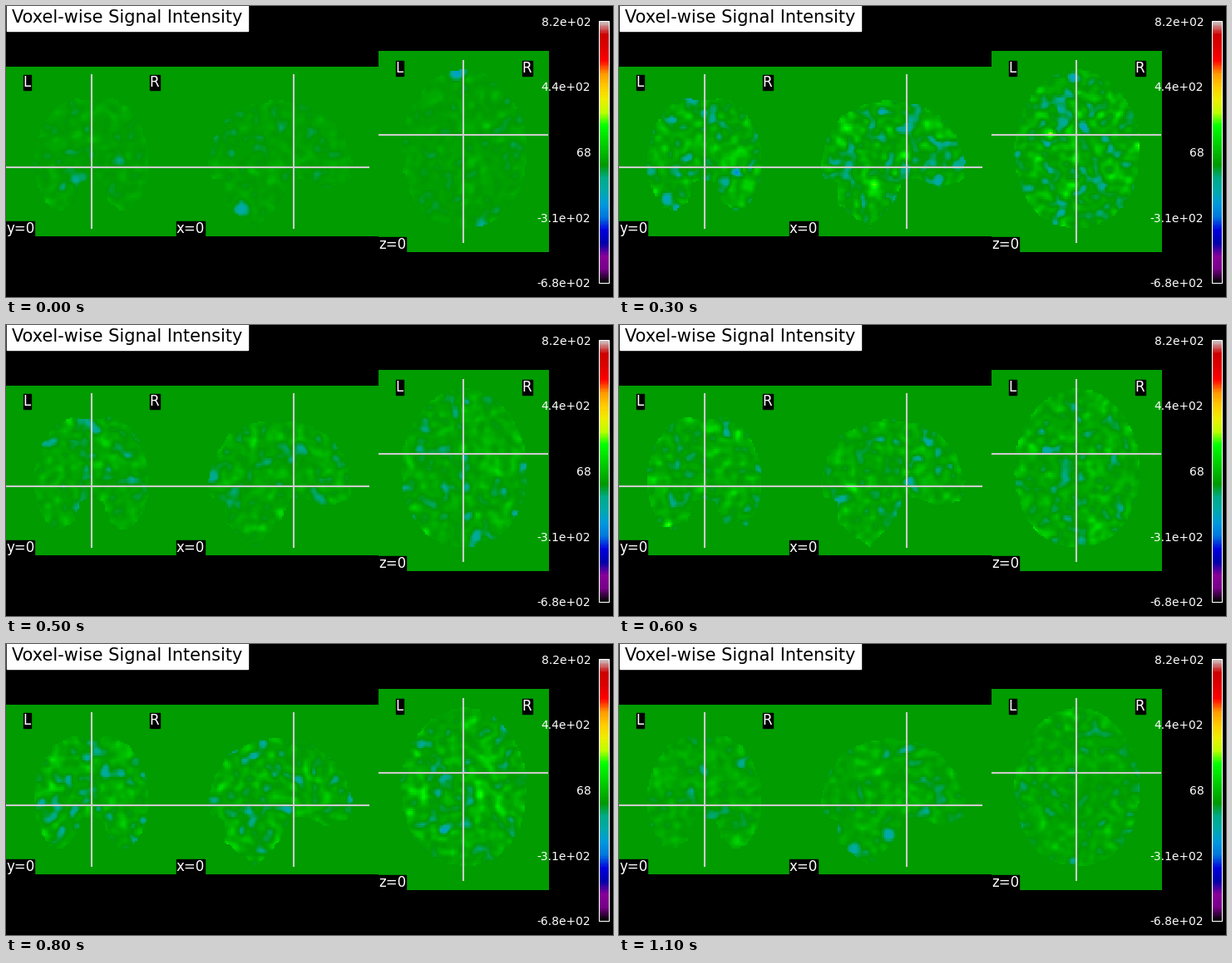
Recreate the animation shown at these times as a matplotlib script. Size 730 by 350 pixels, loop 1.2 s.

```python
import numpy as np
import matplotlib.pyplot as plt
from matplotlib.animation import FuncAnimation
from matplotlib.cm import ScalarMappable
from matplotlib.colors import Normalize
from matplotlib.path import Path

np.random.seed(7)

W, H, DPI = 730, 350, 100
FRAMES, STEP = 12, 100
NORM = Normalize(-680, 816)
CMAP = "nipy_spectral"

plt.rcParams["font.family"] = "DejaVu Sans"

# left, right, top, bottom in pixels; columns, rows in voxels
PANELS = {
    "y": (0, 205, 73, 277, 91, 91),
    "x": (205, 448, 73, 277, 109, 91),
    "z": (448, 653, 54, 296, 91, 109),
}

# mean and spread of the signal in each volume
LEVELS = [(7, 15), (14, 35), (26, 46), (12, 46), (12, 36), (15, 29),
          (15, 34), (14, 40), (14, 36), (18, 37), (18, 32), (14, 25)]

# strong spots per volume: x, y, amplitude
SPOTS = {
    0: [(283, 244, -170), (541, 81, -190), (84, 209, -110),
        (572, 263, -110), (137, 186, -90)],
    2: [(543, 82, 330), (381, 153, -120), (330, 193, -110),
        (608, 185, -100), (292, 168, 100)],
    3: [(307, 215, 240), (60, 236, -100), (125, 212, -100),
        (395, 180, -100), (530, 140, -90)],
    5: [(250, 182, -120), (360, 150, -100), (382, 210, -100),
        (566, 256, -120), (503, 126, -100)],
    7: [(380, 208, -130), (310, 250, -120), (575, 248, -110),
        (545, 84, 130), (600, 157, -100)],
    9: [(325, 212, -100), (140, 236, -110), (575, 86, 130),
        (380, 203, -100), (612, 152, -110)],
    11: [(324, 230, -190), (283, 246, -170), (110, 207, -100),
         (370, 200, -100), (140, 237, 90)],
}


def grid(name):
    x0, x1, y0, y1, nx, ny = PANELS[name]
    x = x0 + (np.arange(nx) + 0.5) * (x1 - x0) / nx
    y = y0 + (np.arange(ny) + 0.5) * (y1 - y0) / ny
    return np.meshgrid(x, y)


def inside(points, x, y):
    pts = np.column_stack([x.ravel(), y.ravel()])
    return Path(points).contains_points(pts).reshape(x.shape)


def brain_mask(name, x, y):
    if name == "z":
        half = 75 - 8 * np.clip((150 - y) / 72, 0, 1)
        return np.abs((x - 551) / half) ** 2.2 + np.abs((y - 172) / 95) ** 2.2 < 1
    if name == "y":
        side = [(-1, 114), (25, 111), (45, 122), (60, 145), (68, 170), (69, 200),
                (62, 225), (50, 243), (35, 246), (20, 235), (14, 212), (-1, 208)]
        return inside(side, np.abs(x - 103), y)
    return inside([(243, 190), (250, 160), (268, 132), (295, 118), (325, 113),
                   (360, 118), (388, 134), (406, 156), (416, 186), (413, 210),
                   (385, 219), (360, 208), (342, 208), (332, 232), (318, 250),
                   (302, 267), (280, 252), (264, 238), (262, 212), (246, 206)], x, y)


def smooth_noise(shape, sigma=1.55):
    t = np.arange(-6, 7)
    k = np.exp(-t ** 2 / (2 * sigma ** 2))
    n = np.random.standard_normal(shape)
    for axis in (0, 1):
        n = np.apply_along_axis(np.convolve, axis, n, k, mode="same")
    return n / n.std()


GRIDS = {name: grid(name) for name in PANELS}
MASKS = {name: brain_mask(name, *GRIDS[name]) for name in PANELS}


def volume_slice(i, name):
    x, y = GRIDS[name]
    mean, spread = LEVELS[i]
    n = smooth_noise(x.shape)
    v = mean + spread * n * (0.65 + 0.25 * np.abs(n))
    for sx, sy, amp in SPOTS.get(i, []):
        v += amp * np.exp(-((x - sx) ** 2 + (y - sy) ** 2) / 45)
    return np.where(MASKS[name], v, 0)


slices = [{name: volume_slice(i, name) for name in PANELS} for i in range(FRAMES)]

fig = plt.figure(figsize=(W / DPI, H / DPI), dpi=DPI, facecolor="k")
ax = fig.add_axes([0, 0, 1, 1])
ax.axis("off")

images = {}
for name, (x0, x1, y0, y1, *_) in PANELS.items():
    images[name] = ax.imshow(slices[0][name], extent=(x0, x1, y1, y0),
                             cmap=CMAP, norm=NORM, interpolation="nearest",
                             aspect="auto")
ax.set(xlim=(0, W), ylim=(H, 0))


def label(x, y, text, ha, va):
    ax.text(x, y, text, size=12, color="w", ha=ha, va=va, zorder=4,
            bbox=dict(boxstyle="square,pad=0", fc="k", ec="k"))


def line(xs, ys):
    ax.plot(xs, ys, color=".8", lw=1.5, zorder=3, scalex=False, scaley=False)


for name, cross in (("y", 103), ("x", 346), ("z", 550)):
    x0, x1, y0, y1, *_ = PANELS[name]
    w, h = x1 - x0, y1 - y0
    line([cross, cross], [y0 + 0.05 * h, y1 - 0.05 * h])
    label(x0, y1, f"{name}=0", "left", "bottom")
    if name != "x":
        label(x0 + 0.1 * w, y0 + 0.05 * h, "L", "left", "top")
        label(x1 - 0.1 * w, y0 + 0.05 * h, "R", "right", "top")
line([0, 435.5], [194, 194])
line([449, 651], [155, 155])

ax.text(0.01 * W, 0.01 * H, "Voxel-wise Signal Intensity", size=15, color="k",
        ha="left", va="top", zorder=5,
        bbox=dict(boxstyle="square,pad=.3", fc="w", ec="w"))

cax = fig.add_axes([713 / W, 1 - 333 / H, 12 / W, 315 / H])
bar = fig.colorbar(ScalarMappable(NORM, CMAP), cax=cax,
                   ticks=np.linspace(NORM.vmin, NORM.vmax, 5), format="%.2g")
bar.outline.set_edgecolor("w")
cax.yaxis.tick_left()
cax.tick_params(axis="y", color="k", labelcolor="w", labelsize=10)


def update(i):
    for name, image in images.items():
        image.set_data(slices[i][name])
    return list(images.values())


anim = FuncAnimation(fig, update, frames=FRAMES, interval=STEP, repeat=True,
                     repeat_delay=0, blit=False)
plt.show()
```
